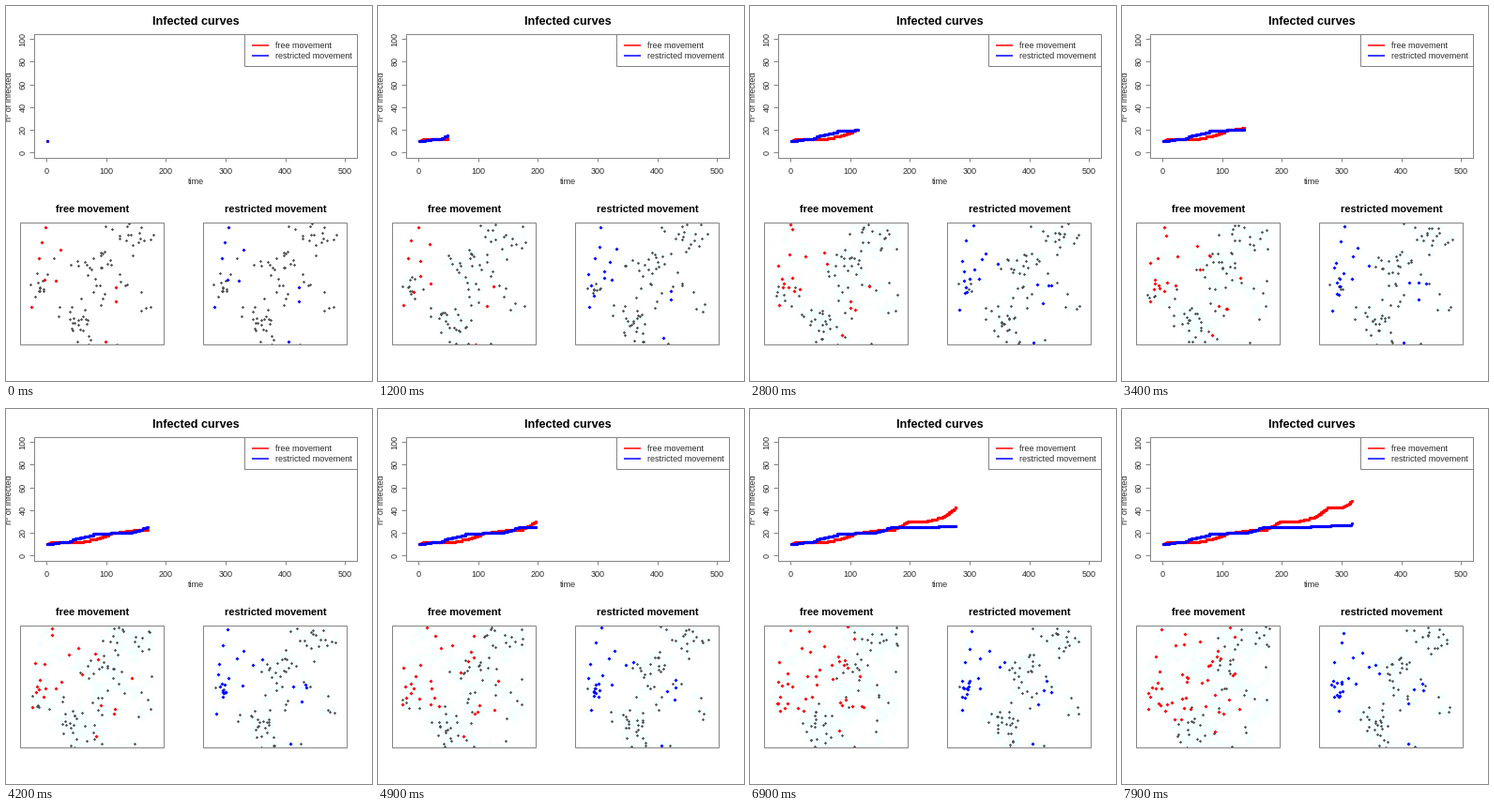
A matplotlib script that plays this animation: 390 by 400 pixels, repeating every 8000 ms.

```python
import numpy as np
import matplotlib.pyplot as plt
from matplotlib.animation import FuncAnimation
from matplotlib.patches import Rectangle

W, H, DPI = 390, 400, 100
PX = 72 / DPI                     # points per pixel
FRAMES, INTERVAL, STRIDE = 80, 100, 4
STEPS = STRIDE * (FRAMES - 1) + 1
LINE, TEXT, WELL, TRAIL = "#858585", "#2b2b2b", "#4d4d4d", "#f4ffff"
LOW, HIGH = (26, 232), (157, 361)  # limits of the walk
SHIFT = np.array([195, 0])         # left panel to right panel

plt.rcParams["font.family"] = "Liberation Sans"
rng = np.random.default_rng(12)

# First patients, and the healthy groups as centre, spread, size
SICK = [(42, 236), (38, 252), (58, 260), (35, 269), (41, 292), (53, 293),
        (27, 321), (117, 300), (117, 315), (106, 358)]
GROUPS = [((36, 296), (5, 8), 12), ((75, 340), (12, 10), 24),
          ((90, 274), (18, 7), 18), ((96, 300), (10, 9), 10),
          ((138, 245), (15, 8), 16), ((140, 295), (13, 32), 10)]


def start_positions():
    crowd = [rng.normal(mid, size, (n, 2)) for mid, size, n in GROUPS]
    return np.clip(np.vstack([SICK, *crowd]), LOW, HIGH)


def walk(start, sigma, keep):
    """Random walk; keep < 1 pulls every point back to its home."""
    path = np.empty((STEPS, *start.shape))
    path[0] = start
    for i in range(1, STEPS):
        step = rng.normal(0, sigma, start.shape)
        pos = start + keep * (path[i - 1] - start) + step
        path[i] = np.clip(pos, LOW, HIGH)
    return path


def counts(*knots):
    """Whole-number totals along straight pieces between (time, total)."""
    t, v = np.array(knots).T
    return np.floor(np.interp(np.arange(1, STEPS + 1), t, v) + 1e-9).astype(int)


def spread(path, total):
    """A random patient infects the nearest healthy point until totals match."""
    sick = np.zeros(path.shape[:2], bool)
    now = np.arange(path.shape[1]) < len(SICK)
    for i in range(STEPS):
        while now.sum() < total[i]:
            source = path[i, rng.choice(np.flatnonzero(now))]
            dist = np.hypot(*(path[i] - source).T)
            dist[now] = np.inf
            now[dist.argmin()] = True
        sick[i] = now
    return sick


home = start_positions()
free_count = counts((1, 10), (8, 12), (52, 12), (85, 15), (110, 20), (146, 23),
                    (172, 23), (197, 30), (222, 30), (237, 32), (255, 34),
                    (276, 42), (300, 42), (317, 48))
held_count = counts((1, 10), (22, 12), (34, 12), (49, 15), (79, 19), (105, 19),
                    (108, 20), (138, 20), (168, 25), (215, 25), (317, 28))

fig = plt.figure(figsize=(W / DPI, H / DPI), dpi=DPI, facecolor="white")
ax = fig.add_axes([0, 0, 1, 1])
ax.set(xlim=(0, W), ylim=(H, 0))
ax.axis("off")


def label(x, y, text, size, **kw):
    kw = {"ha": "center", "va": "baseline", "color": TEXT, **kw}
    ax.text(x, y, text, fontsize=size * PX, zorder=9, **kw)


def heading(x, y, text, size):
    label(x, y, text, size, weight="bold", color="black")


def box(x0, y0, x1, y1, z=6, fill="none"):
    rect = Rectangle((x0, y0), x1 - x0, y1 - y0, fc=fill, ec=LINE,
                     lw=PX, zorder=z)
    return ax.add_patch(rect)


def rule(xs, ys, color=LINE, width=1.0):
    ax.plot(xs, ys, color=color, lw=width * PX, zorder=8,
            solid_capstyle="butt")


def px_x(t):
    return 43 + 0.6363 * np.asarray(t)


def px_y(n):
    return 156.4 - 1.213 * np.asarray(n)


# Chart frame, axes and legend
box(29.5, 29.5, 373.5, 161.5)
heading(202, 20, "Infected curves", 12.6)
label(202.3, 190.2, "time", 9)
side = {"rotation": 90, "rotation_mode": "anchor"}
label(6.5, 96.5, "nº of infected", 9, **side)
for t in range(0, 501, 100):
    rule([px_x(t)] * 2, [161.5, 166])
    label(px_x(t), 179.3, str(t), 9)
for n in range(0, 101, 20):
    rule([25, 29.5], [px_y(n)] * 2)
    label(20.5, px_y(n), str(n), 9, **side)
box(253.5, 29.5, 373.5, 63.5, z=7, fill="white")
for y, color, name in [(41.5, "red", "free movement"),
                       (52.5, "blue", "restricted movement")]:
    rule([262, 279.5], [y, y], color, 1.5)
    label(287, y + 3.4, name, 9, ha="left")


class Panel:
    """One crowd with its trails, and its curve in the chart."""

    def __init__(self, path, total, color, shift, title):
        self.path, self.total = path + shift, total
        self.sick = spread(path, total)
        frame = box(14.5 + shift[0], 230.5, 167.5 + shift[0], 360.5)
        heading(92 + shift[0], 219.8, title, 11)
        self.trail, = ax.plot([], [], color=TRAIL, lw=PX, zorder=1)
        self.well = self.dots(WELL, 2.3, 3)
        self.ill = self.dots(color, 2.8, 4)
        for art in (self.trail, self.well, self.ill):
            art.set_clip_path(frame)
        self.curve, = ax.plot([], [], "o", color=color, ms=3.2 * PX, mew=0,
                              zorder=5)

    def dots(self, color, size, z):
        return ax.plot([], [], "D", color=color, ms=size * PX, mew=0,
                       zorder=z)[0]

    def show(self, i):
        pos, sick = self.path[i], self.sick[i]
        self.well.set_data(*pos[~sick].T)
        self.ill.set_data(*pos[sick].T)
        gap = np.full((1, *pos.shape), np.nan)
        lines = np.concatenate([self.path[:i + 1], gap])
        self.trail.set_data(*lines.transpose(2, 1, 0).reshape(2, -1))
        self.curve.set_data(px_x(np.arange(1, i + 2)),
                            px_y(self.total[:i + 1]))
        return self.trail, self.well, self.ill, self.curve


panels = [
    Panel(walk(home, 0.75, 1), free_count, "red", 0 * SHIFT,
          "free movement"),
    Panel(walk(home, 0.5, 0.985), held_count, "blue", SHIFT,
          "restricted movement"),
]


def draw(k):
    return [art for p in panels for art in p.show(k * STRIDE)]


anim = FuncAnimation(fig, draw, frames=FRAMES, interval=INTERVAL,
                     repeat=True, repeat_delay=0, blit=False)
plt.show()
```
